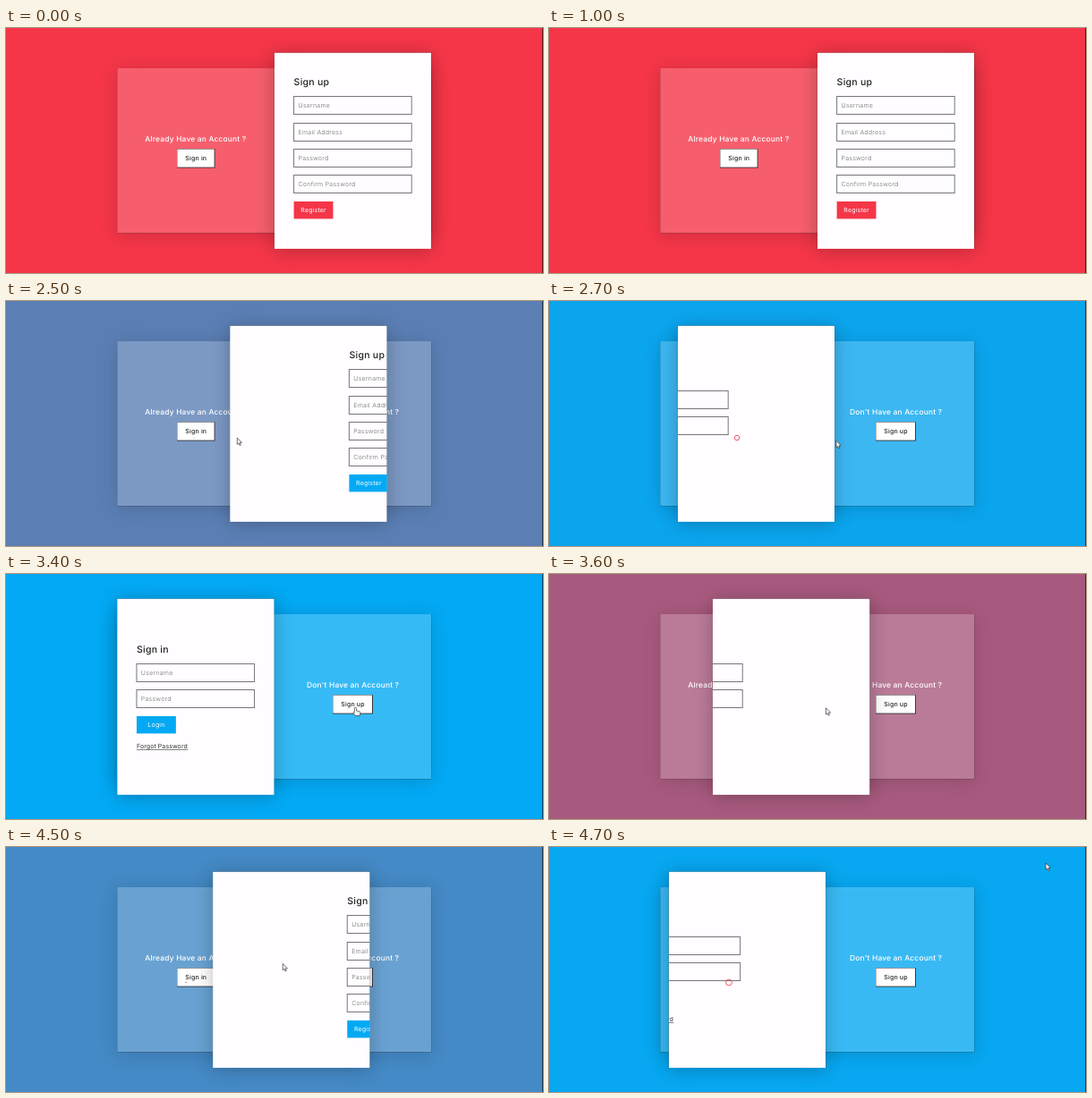
Recreate the animation shown at these times as an HTML page with a canvas. Size 600 by 274 pixels, loop 4800 ms.

```html
<!DOCTYPE html>
<html lang="en">
<head>
<meta charset="utf-8">
<title>Sliding sign in form</title>
<style>
  html, body { margin: 0; width: 100%; height: 100%; overflow: hidden; background: #f43648; }
  canvas { display: block; width: 600px; height: 274px; }
</style>
</head>
<body>
<canvas id="stage" width="600" height="274"></canvas>
<script>
const ctx = document.getElementById('stage').getContext('2d');
const LOOP = 4800;
const RED = [244, 54, 72], BLUE = [3, 169, 244];
const LEFT = 124.2, HALF = 175.5, PAD = 21.9;
const FONT = 'Inter, "Open Sans", sans-serif';

const rgb = c => `rgb(${c.map(Math.round).join(',')})`;
const mix = (a, b, k) => a + (b - a) * k;
const clamp = v => Math.min(1, Math.max(0, v));

function bezier(x1, y1, x2, y2) {
  const at = (a, b, u) => 3 * a * u * (1 - u) ** 2 + 3 * b * u * u * (1 - u) + u ** 3;
  return x => {
    if (x <= 0 || x >= 1) return clamp(x);
    let lo = 0, hi = 1;
    for (let i = 0; i < 24; i++) {
      const mid = (lo + hi) / 2;
      if (at(x1, x2, mid) < x) lo = mid; else hi = mid;
    }
    return at(y1, y2, lo);
  };
}
const ease = bezier(0.25, 0.1, 0.25, 1);
const easeInOut = bezier(0.42, 0, 0.58, 1);

// Each click flips the card between sign up (right) and sign in (left).
const clicks = [
  { t: 2317, x: 210, y: 153, signUp: false },
  { t: 3400, x: 394.5, y: 147.5, signUp: true },
  { t: 4283, x: 201, y: 151.5, signUp: false }
];

// Pointer path: time, x, y of the hot spot.
const path = [
  [1900, 222, 166], [2000, 215, 157.5], [2120, 209, 152], [2317, 210, 153],
  [2500, 258, 153], [2800, 352, 158], [3100, 390.5, 150], [3400, 390.5, 150],
  [3470, 388, 149], [3650, 280, 150], [3900, 203, 151.5], [4000, 202, 151.5],
  [4283, 201, 151.5], [4500, 308, 131], [4700, 555, 18], [4800, 566, 12]
];
const buttons = [
  { x: 191, w: 42.5, label: 'Sign in' },
  { x: 365, w: 45, label: 'Sign up' }
];

function text(str, x, y, size, weight, color, spacing = 0.03, align = 'left') {
  ctx.font = `${weight} ${size}px ${FONT}`;
  ctx.letterSpacing = `${size * spacing}px`;
  ctx.textRendering = 'geometricPrecision';
  ctx.textAlign = align;
  ctx.fillStyle = color;
  ctx.fillText(str, x, y);
}

function box(x, y, w, h, color) {
  ctx.fillStyle = color;
  ctx.fillRect(x, y, w, h);
}

// Shadow outside the box only, as CSS box-shadow does.
function shadow(x, y, w, h, alpha) {
  ctx.save();
  ctx.beginPath();
  ctx.rect(0, 0, 600, 274);
  ctx.rect(x, y, w, h);
  ctx.clip('evenodd');
  ctx.shadowColor = `rgba(0,0,0,${alpha})`;
  ctx.shadowBlur = 19.7;
  ctx.shadowOffsetY = 2.2;
  box(x, y, w, h, '#000');
  ctx.restore();
}

function prompt(label, cx, button) {
  text(label, cx, 127.4, 8.42, 500, '#fff', 0.022, 'center');
  const { x, w } = button;
  box(x, 135.2, w, 21.3, '#333');
  box(x, 135.2, w - 0.9, 20.4, '#8b8486');
  box(x + 0.6, 135.8, w - 1.6, 19.7, '#fff');
  text(button.label, x + w / 2, 148.4, 7.02, 500, '#222', 0.025, 'center');
}

function field(label, x, y) {
  ctx.strokeStyle = '#77757a';
  ctx.lineWidth = 1;
  ctx.strokeRect(x, y, 131.6, 20);
  text(label, x + 4.9, y + 12.7, 7.02, 300, '#707070', 0.036);
}

function submit(label, x, y, color) {
  box(x, y, 43.9, 19.4, color);
  text(label, x + 22, y + 12.3, 7.02, 400, '#fff', 0.025, 'center');
}

function signUpForm(x, color) {
  text('Sign up', x, 63.8, 10.53, 500, '#222', 0.025);
  ['Username', 'Email Address', 'Password', 'Confirm Password']
    .forEach((label, i) => field(label, x, Math.round(76.3 + 29.27 * i) + 0.5));
  submit('Register', x, 194, color);
}

function signInForm(x) {
  text('Sign in', x, 87.7, 10.53, 500, '#222', 0.025);
  field('Username', x, 100.5);
  field('Password', x, 129.5);
  submit('Login', x, 159, rgb(BLUE));
  text('Forgot Password', x, 195, 7.02, 400, '#333', 0.01);
  box(x, 196, 57.3, 0.6, '#333');
}

function pointerAt(t) {
  const i = path.findIndex(p => p[0] > t);
  if (i < 1) return null;
  const [a, b] = [path[i - 1], path[i]];
  const k = (t - a[0]) / (b[0] - a[0]);
  return { x: mix(a[1], b[1], k), y: mix(a[2], b[2], k) };
}

function drawPointer(p, cardX) {
  const covered = p.x > cardX && p.x < cardX + HALF;
  const hand = !covered && p.y > 135 && p.y < 156.5 &&
    buttons.some(b => p.x > b.x && p.x < b.x + b.w);
  const shape = hand
    ? 'M0-.8 Q1.1-.8 1.1.3 V3 L4.4 3.7 Q5.6 4 5.4 5.3 L4.8 8.6 H0 L-2.7 5.2 Q-2.2 4-1.1 5 V.3 Q-1.1-.8 0-.8Z'
    : 'M0 0 V7.4 L1.7 5.9 L2.8 8.5 L4 8 L2.9 5.4 H5.2Z';
  const outline = new Path2D(shape);
  ctx.save();
  ctx.translate(p.x, p.y);
  ctx.fillStyle = '#fff';
  ctx.fill(outline);
  ctx.strokeStyle = '#333';
  ctx.lineWidth = 0.7;
  ctx.stroke(outline);
  ctx.restore();
}

function drawRing(click, age) {
  if (age < 150 || age > 800) return;
  ctx.save();
  ctx.globalAlpha = clamp((800 - age) / 150);
  ctx.strokeStyle = '#e84a58';
  ctx.lineWidth = 0.9;
  ctx.beginPath();
  ctx.arc(click.x, click.y, 7.8 * ((age - 150) / 450) ** 1.6, 0, Math.PI * 2);
  ctx.stroke();
  ctx.restore();
}

function draw(t) {
  const click = clicks.filter(c => c.t <= t).pop();
  const signUp = click ? click.signUp : true;
  const age = click ? t - click.t : Infinity;
  const toward = k => signUp ? k : 1 - k;

  const now = ease(age / 500), later = ease((age - 250) / 500);
  const tint = toward(now);
  const cardX = LEFT + HALF * toward(easeInOut(age / 500));
  const upShift = HALF * (signUp ? 1 - later : now);
  const inShift = -HALF * (signUp ? now : 1 - later);

  box(0, 0, 600, 274, rgb(BLUE.map((c, i) => mix(c, RED[i], tint))));
  shadow(LEFT, 45, HALF * 2, 184.3, 0.15);
  box(LEFT, 45, HALF * 2, 184.3, 'rgba(255,255,255,0.2)');
  prompt('Already Have an Account ?', 211.9, buttons[0]);
  prompt('Don\u2019t Have an Account ?'.replace('\u2019', "'"), 387.6, buttons[1]);

  shadow(cardX, 27.5, HALF, 219.4, 0.25);
  ctx.save();
  ctx.beginPath();
  ctx.rect(cardX, 27.5, HALF, 219.4);
  ctx.clip();
  box(cardX, 27.5, HALF, 219.4, '#fffdff');
  signInForm(cardX + PAD + inShift);
  signUpForm(cardX + PAD + upShift, rgb(signUp ? RED : BLUE));
  ctx.restore();

  if (click) drawRing(click, age);
  const pointer = pointerAt(t);
  if (pointer) drawPointer(pointer, cardX);
  box(599, 0, 1, 274, 'rgba(0,0,0,0.6)');
}

const start = performance.now();
function frame() {
  draw((performance.now() - start) % LOOP);
  requestAnimationFrame(frame);
}
frame();
</script>
</body>
</html>
```
